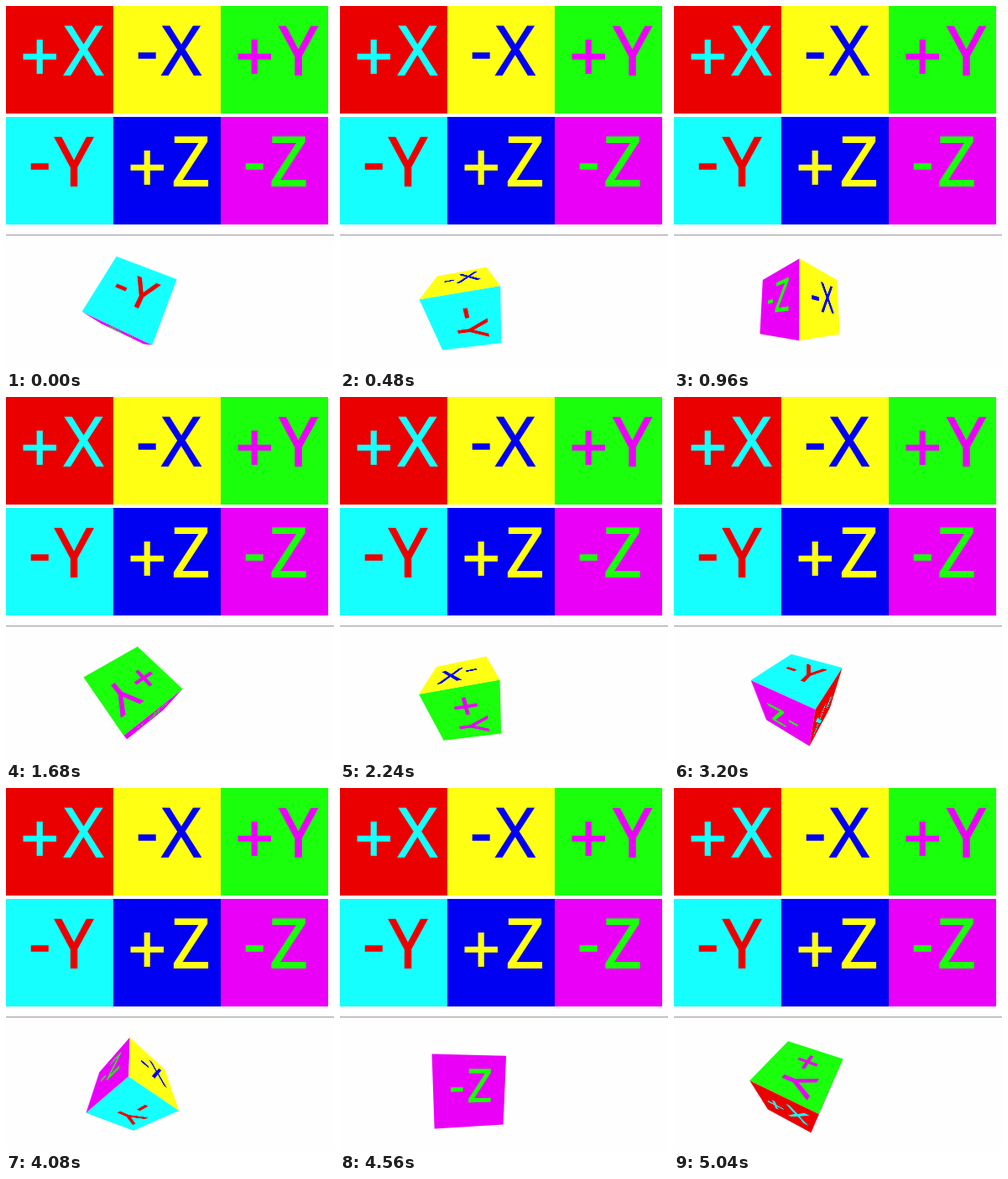
An HTML page for the animation above (5120 ms loop, 391 by 432 pixels).

```html
<!DOCTYPE html>
<html lang="en">
<head>
<meta charset="utf-8">
<title>Cube map faces</title>
<style>
  html, body { margin: 0; width: 100%; height: 100%; overflow: hidden; background: #fefefe; }
  svg { position: absolute; width: 128px; height: 128px; overflow: hidden; }
  text { font: 80.5px "Open Sans", "Noto Sans", sans-serif; text-anchor: middle; stroke-width: 1.7px; }
  #rule { position: absolute; top: 272px; width: 391px; height: 1px;
    background: #a2a2a2; border-bottom: 1px solid #eee; }
  #scene { position: absolute; left: 86px; top: 293px; width: 128px; height: 128px;
    perspective: 256px; transform: scale(.5074); }
  #cube { width: 128px; height: 128px; transform-style: preserve-3d; }
  #cube svg { left: 0; top: 0; backface-visibility: hidden; }
</style>
</head>
<body>
<div id="tiles"></div>
<div id="rule"></div>
<div id="scene"><div id="cube"></div></div>
<script>
  const red = '#eb0000', cyan = '#16ffff', yellow = '#ffff13',
        blue = '#0000f2', green = '#1aff0c', magenta = '#eb00f7';

  // label, background, ink, orientation on the cube
  const faces = [
    ['+X', red, cyan, 'rotateY(90deg)'],
    ['-X', yellow, blue, 'rotateY(-90deg)'],
    ['+Y', green, magenta, 'rotateX(90deg)'],
    ['-Y', cyan, red, 'rotateX(-90deg)'],
    ['+Z', blue, yellow, ''],
    ['-Z', magenta, green, 'rotateY(180deg)']
  ];

  const faceSvg = ([sign, letter], back, ink, style) => {
    const plus = sign === '+';
    return `<svg viewBox="0 0 128 128" style="background:${back};${style}" fill="${ink}" stroke="${ink}">
      <text x="40.2" y="${plus ? 88.5 : 81.3}">${sign}</text>
      <text x="${plus ? 92.5 : 81}" y="82.3">${letter}</text></svg>`;
  };

  const tiles = document.getElementById('tiles');
  const cube = document.getElementById('cube');
  faces.forEach(([label, back, ink, turn], i) => {
    const left = i % 3 * 128, top = Math.floor(i / 3) * 132;
    tiles.innerHTML += faceSvg(label, back, ink, `left:${left}px;top:${top}px`);
    cube.innerHTML += faceSvg(label, back, ink, `transform:${turn} translateZ(64px)`);
  });

  const LOOP = 5120, STEP = 80;
  function draw() {
    const t = Math.floor(performance.now() % LOOP / STEP) * STEP / 1000;
    const angle = 1331.5 + 104.2 * t;
    cube.style.transform = `rotateX(${-angle}deg) rotateY(${angle * 1.1}deg)`;
    requestAnimationFrame(draw);
  }
  draw();
</script>
</body>
</html>
```
